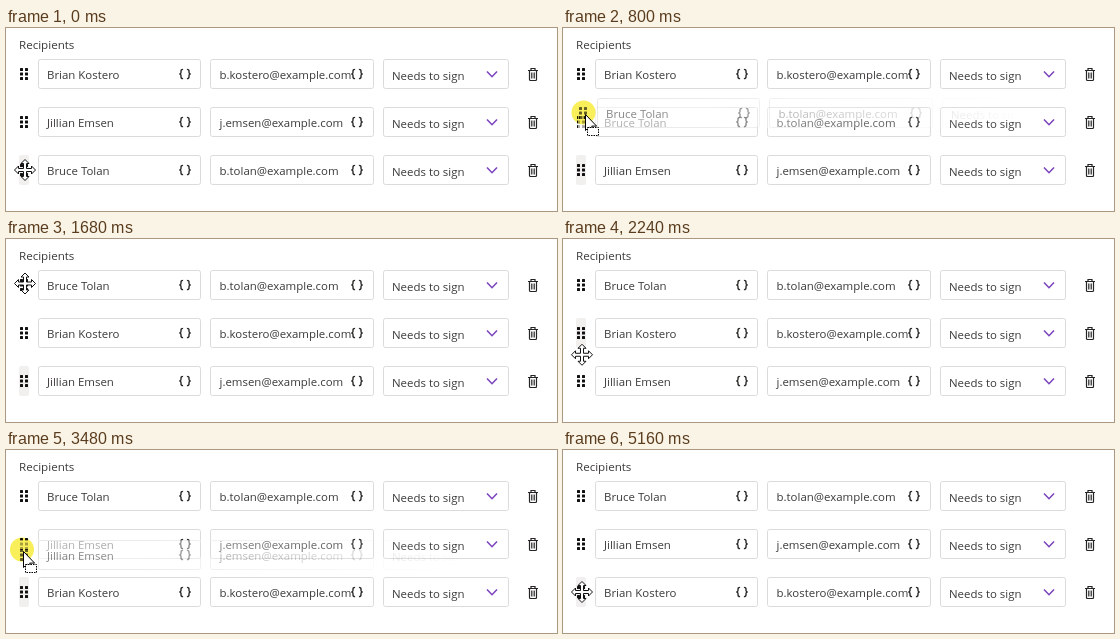
Recreate the animation shown at these times as an HTML page. Size 551x183 px, loop 5400 ms.

```html
<!DOCTYPE html>
<html lang="en">
<head>
<meta charset="utf-8">
<title>Reorder recipients</title>
<style>
html, body { margin: 0; width: 100%; height: 100%; overflow: hidden; background: #fff; }
svg { display: block; width: 551px; height: 183px; }
text { font: 11.45px "Open Sans", "Noto Sans", sans-serif; fill: #3b3a39; }
.title { font-size: 11.6px; font-weight: 500; }
.box { fill: #fff; stroke: #dcdbda; }
.brace { fill: none; stroke: #2b2a29; stroke-width: 1.4; }
.chevron { fill: none; stroke: #7b45bd; stroke-width: 1.6; }
.trash { fill: none; stroke: #252423; stroke-width: 1.2; }
.dots { fill: #111; }
.halo { mix-blend-mode: multiply; }
</style>
</head>
<body>
<svg viewBox="0 0 551 183">
  <defs>
    <linearGradient id="fade" gradientUnits="userSpaceOnUse" x1="0" y1="0" x2="458" y2="0">
      <stop offset="0" stop-color="#fff" stop-opacity=".66"/>
      <stop offset=".3" stop-color="#fff" stop-opacity=".55"/>
      <stop offset=".55" stop-color="#fff" stop-opacity=".3"/>
      <stop offset=".85" stop-color="#fff" stop-opacity=".1"/>
      <stop offset="1" stop-color="#fff" stop-opacity="0"/>
    </linearGradient>
    <mask id="ghostMask" maskUnits="userSpaceOnUse" x="0" y="20" width="551" height="50">
      <rect y="20" width="551" height="50" fill="url(#fade)"/>
    </mask>
  </defs>
  <rect width="551" height="183" fill="#fff"/>
  <text class="title" x="13" y="21">Recipients</text>
  <rect id="hover" x="13" y="31" width="10" height="30" rx="2" fill="#f1f0ef"/>
  <g id="rows"></g>
  <g id="ghost"><g id="ghostBody" mask="url(#ghostMask)"></g></g>
  <circle id="halo" class="halo" r="12" fill="#f7ea22"/>
  <path id="move" stroke="#111" stroke-width="1"/>
  <g id="arrow" stroke="#000" fill="#fff">
    <path d="M1.5 1.5V17.5L5.2 14L7.8 19.5L10.2 18.4L7.7 13.1H12.6Z"/>
    <rect x="3.5" y="14.5" width="11" height="8" stroke-dasharray="1.5 1"/>
  </g>
</svg>
<script>
const LOOP = 5400, STEP = 40, PITCH = 48;
const NS = "http://www.w3.org/2000/svg";
const $ = id => document.getElementById(id);

const people = [
  ["Brian Kostero", "b.kostero@example.com"],
  ["Jillian Emsen", "j.emsen@example.com"],
  ["Bruce Tolan", "b.tolan@example.com"]
];

// Pointer stops: time, x, y
const stops = [
  [0, 19, 142], [440, 19, 142], [620, 20, 116], [800, 20.5, 84.5], [1000, 19, 68],
  [1040, 19, 68], [1200, 19, 52], [1320, 19, 44.5], [1840, 19, 44.5],
  [2100, 22.5, 91], [2360, 16, 137], [3040, 16, 137], [3240, 15, 119],
  [3480, 16, 99.5], [3600, 16, 95.5], [4440, 16, 95.5], [4480, 17, 100],
  [4760, 19, 125], [5000, 19, 140], [5120, 19, 140], [5160, 19, 142]
];

// Each drag lifts the person in the last slot; hover stays put until the pointer moves again
const drags = [
  { press: 280, lift: 480, drop: 1680, wake: 1880, who: 2, order: [0, 1, 2], grab: [19, 142] },
  { press: 2520, lift: 3080, drop: 4000, wake: 4480, who: 1, order: [2, 0, 1], grab: [16, 137] }
];
const finalOrder = [2, 1, 0];

function add(parent, tag, attrs, text) {
  const el = document.createElementNS(NS, tag);
  for (const key in attrs) el.setAttribute(key, attrs[key]);
  if (text) el.textContent = text;
  return parent.appendChild(el);
}

function addBox(parent, x, width) {
  add(parent, "rect", { class: "box", x, y: 31.5, width, height: 29, rx: 2 });
}

function addBraces(parent, cx) {
  const half = "M-1.9-4.6Q-4-4.6-4-2.9V-1.4Q-4 0-5.7 0Q-4 0-4 1.4V2.9Q-4 4.6-1.9 4.6";
  for (const side of [1, -1])
    add(parent, "path", { class: "brace", d: half, transform: `translate(${cx} 46) scale(${side} 1)` });
}

function buildRow(parent) {
  const dots = add(parent, "g", { class: "dots" });
  for (let i = 0; i < 6; i++)
    add(dots, "rect", { x: 14 + (i % 2) * 5, y: 40 + (i >> 1) * 4.5, width: 3, height: 3, rx: .5 });
  addBox(parent, 32.5, 162);
  addBox(parent, 204.5, 163);
  addBox(parent, 377.5, 125);
  const name = add(parent, "text", { x: 41, y: 51 });
  const mail = add(parent, "text", { x: 213.5, y: 51 });
  addBraces(parent, 179);
  addBraces(parent, 351);
  add(parent, "text", { x: 386, y: 52 }, "Needs to sign");
  add(parent, "path", { class: "chevron", d: "M481 43.5L486 48.7L491 43.5" });
  add(parent, "path", {
    class: "trash",
    d: "M522 42.5H532M525 42V40.5H529V42M523.5 42.5V51.5Q523.5 52.5 524.5 52.5H529.5Q530.5 52.5 530.5 51.5V42.5M525.8 44.5V50.5M528.2 44.5V50.5"
  });
  return who => [name.textContent, mail.textContent] = people[who];
}

const fillSlot = [0, 1, 2].map(i =>
  buildRow(add($("rows"), "g", { transform: `translate(0 ${i * PITCH})` })));
add($("ghostBody"), "rect", { x: 13, y: 31, width: 520, height: 30, fill: "#fff" });
const fillGhost = buildRow($("ghostBody"));

// One arm of the four-way cursor, turned three times
const arm = [[-1.5, -1.5], [-1.5, -6.5], [-4, -6.5], [0, -10.5], [4, -6.5], [1.5, -6.5]];
const outline = [];
for (let turn = 0, pts = arm; turn < 4; turn++) {
  outline.push(...pts);
  pts = pts.map(([x, y]) => [-y, x]);
}
$("move").setAttribute("d", "M" + outline.join("L") + "Z");

function pointerAt(t) {
  const i = stops.findIndex(s => s[0] > t);
  if (i < 0) return stops[stops.length - 1].slice(1);
  const [t0, x0, y0] = stops[i - 1], [t1, x1, y1] = stops[i];
  const k = (t - t0) / (t1 - t0);
  return [x0 + (x1 - x0) * k, y0 + (y1 - y0) * k];
}

const slotAt = y => Math.max(0, Math.min(2, Math.floor((y - 22) / PITCH)));
const show = (id, on) => $(id).setAttribute("visibility", on ? "visible" : "hidden");
const place = (id, x, y) => $(id).setAttribute("transform", `translate(${x} ${y})`);

function orderAt(t, y) {
  const next = drags.find(d => t < d.drop);
  if (!next) return finalOrder;
  if (t < next.lift) return next.order;
  const order = next.order.filter(p => p !== next.who);
  order.splice(slotAt(y), 0, next.who);
  return order;
}

function draw(time) {
  const t = Math.floor(time % LOOP / STEP) * STEP;
  const [x, y] = pointerAt(t);
  const during = (from, to) => drags.find(d => t >= d[from] && t < d[to]);
  const pressed = during("press", "drop");
  const drag = during("lift", "drop");

  orderAt(t, y).forEach((who, slot) => fillSlot[slot](who));
  place("hover", 0, PITCH * (during("lift", "wake") ? 2 : slotAt(y)));

  show("ghost", drag);
  if (drag) {
    fillGhost(drag.who);
    place("ghost", Math.round(x - drag.grab[0]), Math.round(2 * PITCH + y - drag.grab[1]));
  }
  show("halo", pressed);
  $("halo").setAttribute("opacity", drag ? .75 : .95);
  $("move").setAttribute("fill", pressed ? "#fbf67c" : "#fff");
  show("move", !drag);
  show("arrow", drag);
  place("halo", x, y);
  place("move", x, y);
  place("arrow", Math.round(x), Math.round(y));
}

const start = performance.now();
function tick() {
  draw(performance.now() - start);
  requestAnimationFrame(tick);
}
tick();
</script>
</body>
</html>
```
